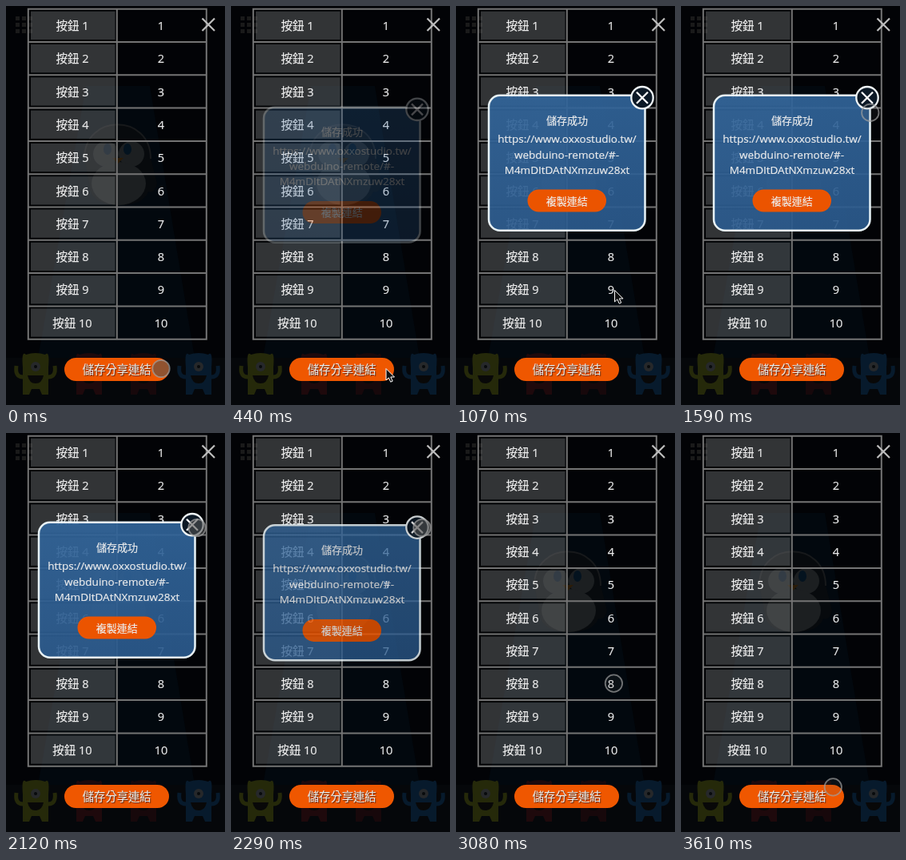
These frames come from a looping animation (274x499 px, 3.69 s). An HTML page:

```html
<!DOCTYPE html>
<html lang="zh-Hant">
<head>
<meta charset="utf-8">
<style>
html, body { margin: 0; width: 100%; height: 100%; overflow: hidden; background: #020306; }
svg { display: block; width: 100vw; height: 100vh; }
text {
  font-family: "Open Sans", "Noto Sans CJK TC", "Noto Sans CJK", "Noto Sans", sans-serif;
  text-anchor: middle; fill: #ededed; stroke: #ededed; stroke-width: .2px;
}
#save text { text-shadow: 1px 1px 1px rgba(0,0,0,.5); }
</style>
</head>
<body>
<svg viewBox="0 0 274 499">
  <defs>
    <linearGradient id="panel" x2="0" y2="1">
      <stop offset="0" stop-color="#316499"/>
      <stop offset="1" stop-color="#2b5a8d"/>
    </linearGradient>
  </defs>

  <!-- dimmed scene -->
  <path d="M100 100H180L236 440H40Z" fill="#02080e"/>
  <path d="M0 440H274V499H0Z" fill="#05070a"/>
  <g id="grid" fill="#1a1a1a"></g>
  <g id="penguin">
    <path d="M98 190C98 134 181 134 181 190L189 222Q186 235 178 232Q172 249 142 249T106 232Z" fill="#070a0d"/>
    <circle cx="125" cy="185" r="16" fill="#1c1f21"/>
    <circle cx="157" cy="185" r="16" fill="#1c1f21"/>
    <ellipse cx="141" cy="222" rx="34" ry="27" fill="#1c1f21"/>
    <path d="M98 191C98 134 181 134 181 191" fill="none" stroke="#17191b" stroke-width="2"/>
    <ellipse cx="127" cy="179" rx="5" ry="7" fill="#04131f"/>
    <ellipse cx="152" cy="179" rx="5" ry="7" fill="#04131f"/>
    <path d="M133 190h14l-7 7z" fill="#2b1c08"/>
  </g>
  <g id="monsters"></g>

  <g id="table"></g>
  <path d="M245.500 15.500l15.500 15.500m0-15.500l-15.500 15.500" stroke="#bebebe" stroke-width="2.200"/>
  <g id="save">
    <rect x="73" y="440" width="131" height="29" rx="14.500" fill="#ef5700"/>
    <text x="138.700" y="460" font-size="14.300">儲存分享連結</text>
  </g>

  <g id="popup">
    <rect x="41" y="111.800" width="195.500" height="169" rx="14" fill="url(#panel)" fill-opacity=".92" stroke="#e8f3f7" stroke-width="2.500"/>
    <text x="139" y="147.500" font-size="13">儲存成功</text>
    <g font-size="13.500">
      <text x="139" y="171">https://www.oxxostudio.tw/</text>
      <text x="138.500" y="190.500">webduino-remote/#-</text>
      <text x="139" y="209.500">M4mDItDAtNXmzuw28xt</text>
    </g>
    <rect x="89.500" y="229.500" width="98.500" height="28" rx="14" fill="#eb5400"/>
    <text x="138.700" y="248.500" font-size="13">複製連結</text>
    <circle cx="233" cy="114.700" r="13.700" fill="#0c1926" stroke="#f0f6f8" stroke-width="2.300"/>
    <path d="M226 107.700l14 14m0-14l-14 14" stroke="#fff" stroke-width="2.300"/>
  </g>

  <circle id="touch" r="10.700" stroke="#a0a0a0" stroke-opacity=".7" stroke-width="1.800"/>
  <path id="arrow" d="M0 0v14.500l3.300-3.100 2.400 5.300 2.500-1.100-2.400-5.100h4.700z" fill="#111" stroke="#fff"/>
</svg>
<script>
const $ = id => document.getElementById(id);
const LOOP = 3690, STEP = LOOP / 42, ROW = 41.3;

for (let i = 0; i < 9; i++)
  $('grid').innerHTML += `<rect x="${12 + i % 3 * 8}" y="${13 + (i / 3 | 0) * 8}" width="5" height="5"/>`;

function monster(x, color, eyes) {
  let art = `<path d="M-16 26V-8Q-18-30-12-24Q0-28 12-24Q18-30 16-8V26H8L5 19H-5L-8 26Z"/>
    <path d="M-16 4Q-26 4-24-10M16 4Q26 4 24-10" fill="none" stroke="${color}" stroke-width="5"/>
    <path d="M-10 2H10Q8 12 0 12T-10 2Z" fill="#080808"/>`;
  for (let i = 0; i < eyes; i++) {
    const at = `cx="${(i - (eyes - 1) / 2) * 12}" cy="-9"`;
    art += `<circle ${at} r="${8 - eyes * 2}" fill="#26282a"/><circle ${at} r="2" fill="#080a0c"/>`;
  }
  $('monsters').innerHTML += `<g transform="translate(${x} 460)" fill="${color}">${art}</g>`;
}
monster(37, '#25290a', 1);
monster(104, '#1e090c', 2);
monster(172, '#17080b', 2);
monster(241, '#071a2c', 1);

let rows = '', lines = 'M27.800 3V417M138.800 3V417M250.800 3V417';
for (let i = 0; i <= 10; i++) {
  const y = 3.7 + i * ROW;
  lines += `M26.800 ${y}H251.800`;
  if (i == 10) break;
  rows += `<rect x="28" y="${y}" width="110" height="${ROW}" fill="#000" fill-opacity=".3"/>
    <rect x="31" y="${y + 3}" width="105.500" height="${ROW - 6}" fill="#f4f9ff" fill-opacity=".2"/>
    <text x="83" y="${y + 26.300}">按鈕 ${i + 1}</text>
    <text x="194" y="${y + 26.300}">${i + 1}</text>`;
}
$('table').innerHTML = `<g font-size="14.500">${rows}</g><path d="${lines}" stroke="#747474" stroke-width="2"/>`;

const part = (t, start, length) => Math.min(1, Math.max(0, (t - start) / length));
const ease = (...span) => (1 - Math.cos(Math.PI * part(...span))) / 2;

// pointer moves: start, length, dx, dy
const moves = [
  [830, 580, 40, -301], [1425, 290, 5, -34], [2470, 290, -19, 59], [2750, 590, -39, 234], [3340, 410, 13, 44]
];

function pointer(t) {
  let x = 194 - 13 * Math.sin(2 * Math.PI * part(t, 830, 580)), y = 453.5;
  for (const [start, length, dx, dy] of moves) {
    const k = ease(t, start, length);
    x += dx * k;
    y += dy * k;
  }
  return [x, y];
}

function place(id, visible, at) {
  $(id).setAttribute('visibility', visible ? 'visible' : 'hidden');
  $(id).setAttribute('transform', `translate(${at})`);
}

function draw(now) {
  // the screen refreshes in even steps
  const t = Math.floor(now % LOOP / STEP + .1) * STEP;
  const shown = ease(t, 323, 335) - ease(t, 2203, 300);
  $('popup').setAttribute('opacity', shown);
  place('popup', shown > 0, [0, 20 * (1 - shown)]);

  const isArrow = t > 400 && t < 1450;
  const pressed = t < 400 || t > 2100 && t < 2350;
  const at = pointer(t);
  place('arrow', isArrow, at);
  place('touch', !isArrow, at);
  $('touch').setAttribute('fill', `rgba(80,80,80,${pressed ? .6 : .12})`);
}

const begin = performance.now();
(function loop() {
  draw(performance.now() - begin);
  requestAnimationFrame(loop);
})();
</script>
</body>
</html>
```
